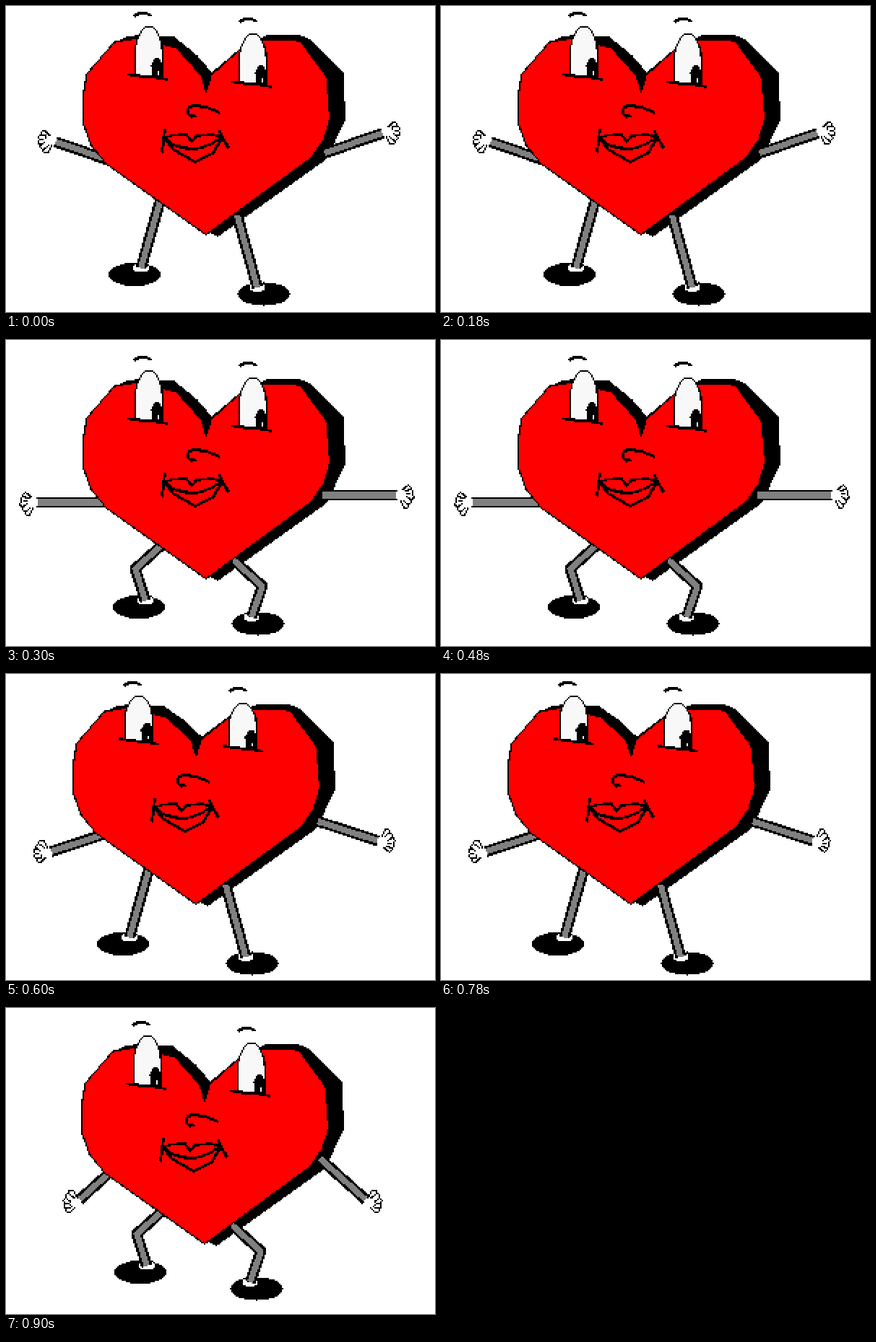
Animation, 594 px wide and 424 px high, one loop 1.2 s. Source, as an HTML page with a canvas:

```html
<!DOCTYPE html>
<html lang="en">
<head>
<meta charset="utf-8">
<title>Dancing heart</title>
<style>
html, body { margin: 0; width: 100%; height: 100%; overflow: hidden; background: #fff; }
canvas { display: block; width: 594px; height: 424px; image-rendering: pixelated; }
</style>
</head>
<body>
<canvas id="stage" width="297" height="212"></canvas>
<script>
const W = 297, H = 212, STEP = 300;
const RED = '#ff0000', GRAY = '#808080', EYE = '#f8f8f8', BLACK = '#000', WHITE = '#fff';

// body: heart shift, lid: extra shift of eye line and notch, tilt: arm angle in degrees,
// reach: arm length, step: leg shift, pinch: how far the legs move together
const poses = [
  { body: [0, 0], lid: 0, tilt: 19, reach: 92, hands: [[62, 186], [528, 174]],
    bent: false, step: [0, 0], pinch: 0 },
  { body: [0, 14], lid: 0, tilt: 0, reach: 109, hands: [[37, 225], [547, 215]],
    bent: true, step: [0, 0], pinch: 0 },
  { body: [-14, 2], lid: -7, tilt: -18, reach: 94, hands: [[56, 248], [521, 233]],
    bent: false, step: [-16, 2], pinch: 0 },
  { body: [-2, 10], lid: 0, tilt: -42, reach: 92, hands: [[97, 270], [503, 270]],
    bent: true, step: [0, -4], pinch: 2 }
];

// Each leg runs from hip to ankle; the foot sits below the ankle.
const straightLegs = [[214, 268, 187, 363], [320, 290, 348, 390]];
const bentLegs = [[216, 284, 179, 317, 193, 361], [315, 305, 355, 341, 340, 384]];

function makeLayer() {
  const c = document.createElement('canvas');
  c.width = W;
  c.height = H;
  return c;
}

const scratch = makeLayer();
const pen = scratch.getContext('2d', { willReadFrequently: true });
let out;
let origin = [0, 0];

// Draws one shape with hard pixel edges.
function ink(draw) {
  pen.setTransform(1, 0, 0, 1, 0, 0);
  pen.clearRect(0, 0, W, H);
  pen.setTransform(0.5, 0, 0, 0.5, origin[0] / 2, origin[1] / 2);
  pen.lineJoin = 'round';
  draw();
  const img = pen.getImageData(0, 0, W, H);
  for (let i = 3; i < img.data.length; i += 4) img.data[i] = img.data[i] > 110 ? 255 : 0;
  pen.putImageData(img, 0, 0);
  out.drawImage(scratch, 0, 0);
}

function fill(path, color) {
  ink(() => { pen.fillStyle = color; pen.fill(path); });
}

function line(path, width, color = BLACK, cap = 'butt') {
  ink(() => {
    pen.strokeStyle = color;
    pen.lineWidth = width;
    pen.lineCap = cap;
    pen.stroke(path);
  });
}

function at([dx, dy], draw) {
  const [x, y] = origin;
  origin = [x + dx, y + dy];
  draw();
  origin = [x, y];
}

function poly(pts, closed) {
  const p = new Path2D();
  for (let i = 0; i < pts.length; i += 2) p.lineTo(pts[i], pts[i + 1]);
  if (closed) p.closePath();
  return p;
}

function oval(x, y, rx, ry) {
  const p = new Path2D();
  p.ellipse(x, y, rx, ry, 0, 0, Math.PI * 2);
  return p;
}

function limb(pts) {
  const p = poly(pts);
  line(p, 15);
  line(p, 8, GRAY);
}

function leg(pts, side) {
  const [x, y] = pts.slice(-2);
  const cuff = oval(x, y, 12, 7);
  fill(oval(x + side * 9, y + 9, 36, 16), BLACK);
  fill(cuff, WHITE);
  line(cuff, 2);
  limb(pts);
}

function hand(side, flip) {
  const spoke = (deg, len) => {
    const a = deg * Math.PI / 180;
    return poly([0, 0, -side * len * Math.cos(a), -flip * len * Math.sin(a)]);
  };
  const finger = (path, width) => {
    line(path, width + 4, BLACK, 'round');
    line(path, width, WHITE, 'round');
  };
  finger(spoke(-65, 15), 6);
  for (let i = 0; i < 4; i++) finger(spoke(-135 - i * 28 + 180, 14), 5);
  fill(oval(0, 0, 7, 7), WHITE);
}

function arm(pos, side, tilt, reach) {
  const a = tilt * Math.PI / 180;
  const dx = side * Math.cos(a), dy = Math.sin(a);
  at(pos, () => {
    limb([dx * 6, dy * 6, dx * reach, dy * reach]);
    hand(side, tilt < 0 ? -1 : 1);
  });
}

function backHeart(lid) {
  fill(poly([154, 49, 166, 43, 184, 40, 232, 42, 264, 68 + lid / 2, 285, 92 + lid,
    323, 60 + lid / 2, 360, 41, 406, 40, 422, 47, 467, 92, 470, 157,
    444, 212, 293, 320, 277, 310, 160, 120], true), BLACK);
}

function frontHeart(lid) {
  const p = poly([150, 50, 184, 44, 236, 58, 271, 97 + lid, 277, 119 + lid,
    284, 96 + lid, 323, 61 + lid / 2, 340, 50, 362, 47, 407, 48, 444, 98, 449, 156,
    440, 185, 423, 210, 277, 317, 139, 219, 118, 193, 107, 163, 107, 122, 112, 94], true);
  fill(p, RED);
  line(p, 2);
}

// Local origin: left corner of the eyeball.
function eye(lid) {
  const top = -69 - lid;
  const ball = new Path2D(`M-1 0V-38C2 ${top + 12} 10 ${top} 18 ${top}S34 ${top + 13} 36 -42L37 2Z`);
  fill(ball, EYE);
  line(ball, 2);
  fill(new Path2D('M22 2L21 -15L26 -24L32 -25L35 -19L36 3Z'), BLACK);
  fill(new Path2D('M30 -6h2v4h-2Z'), EYE);
  line(new Path2D('M-11 -2L18 1L45 5M0 0L36 3'), 3);
}

function brow() {
  line(new Path2D('M177 14Q189 6 201 13'), 3.6);
}

function lips() {
  line(new Path2D('M220 170L216 203M295 172L308 197'), 3.4);
  line(new Path2D('M219 183L231 179L250 178L257 188L264 180L284 178L299 181'), 3.4);
  line(new Path2D('M219 180Q228 197 262 198Q286 194 299 180'), 3.4);
  line(new Path2D('M219 183L232 199L262 216L287 203L300 182'), 3.4);
}

function face(lid) {
  at([180, 97 + lid], () => eye(lid));
  at([324, 107 + lid], () => eye(lid));
  brow();
  at([146, 8], brow);
  line(new Path2D('M263 152L256 153L251 148Q251 139 261 138L278 140L296 148'), 3.6);
  lips();
}

function render(pose) {
  const layer = makeLayer();
  out = layer.getContext('2d');
  out.fillStyle = WHITE;
  out.fillRect(0, 0, W, H);

  const legs = pose.bent ? bentLegs : straightLegs;
  at(pose.body, () => backHeart(pose.lid));
  [1, -1].forEach((side, i) => {
    const [dx, dy] = pose.step;
    at([dx + side * pose.pinch, dy], () => leg(legs[i], -side));
    arm(pose.hands[i], side, pose.tilt, pose.reach);
  });
  at(pose.body, () => {
    frontHeart(pose.lid);
    face(pose.lid);
  });
  return layer;
}

const frames = poses.map(render);
const stage = document.getElementById('stage').getContext('2d');
const start = performance.now();

function tick() {
  const t = Math.max(0, performance.now() - start);
  stage.drawImage(frames[Math.floor(t / STEP) % frames.length], 0, 0);
  requestAnimationFrame(tick);
}
tick();
</script>
</body>
</html>
```
